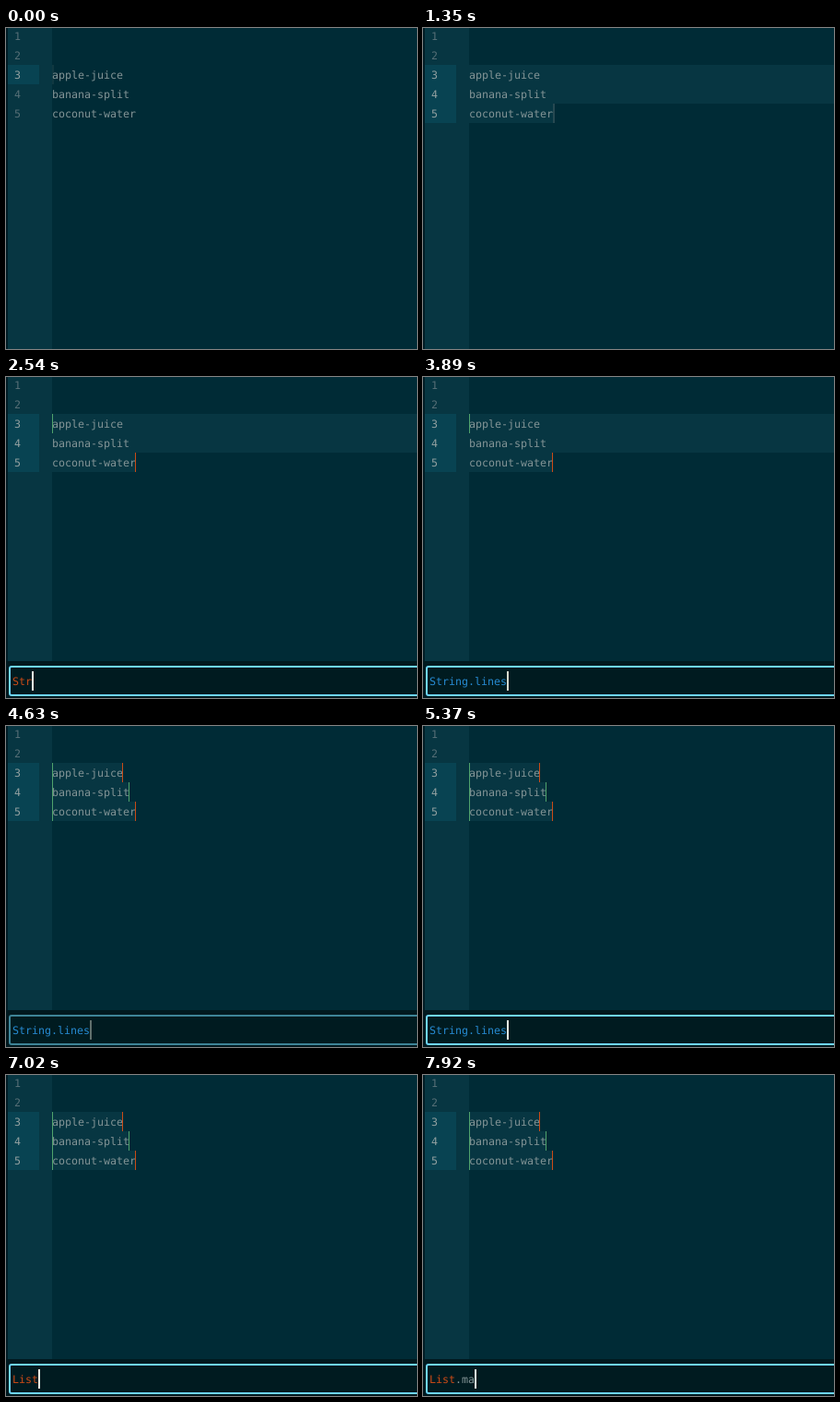
Recreate the animation shown at these times as an HTML page. Size 446 by 348 pixels, loop 8 s.

```html
<!DOCTYPE html>
<html lang="en">
<head>
<meta charset="utf-8">
<title>Editor command line</title>
<style>
  html, body { margin: 0; width: 100%; height: 100%; overflow: hidden; background: #002b36; }
  svg { display: block; width: 446px; height: 348px; }
  text {
    font: 11.63px "DejaVu Sans Mono", monospace;
    text-rendering: geometricPrecision;
    white-space: pre;
    fill: #839496;
  }
  .number { fill: #566f76; }
  .number.active { fill: #93a1a1; }
</style>
</head>
<body>
<svg id="stage" viewBox="0 0 446 348"></svg>
<script>
const stage = document.getElementById('stage');
const LOOP = 8000, CHAR = 7, ROW = 21, LEFT = 50, INPUT_X = 7;
const lines = ['', '', 'apple-juice', 'banana-split', 'coconut-water'];
const GREEN = '#4fa36c', RED = '#cb4b16', BLUE = '#268bd2', GREY = '#839496';

// Each step lists only what changes from that time on.
const steps = [
  [0, { row: 3, col: 0, caret: 0.12, panel: false, marks: '', input: '',
        color: RED, inputCaret: 0, border: '#6fd6fb', selected: false }],
  [150, { caret: 0.6 }],
  [300, { row: 4, caret: 0.8 }],
  [450, { row: 5 }],
  [600, { col: 13 }],
  [750, { caret: 0.9 }],
  [1200, { caret: 0.6 }],
  [1350, { caret: 0.3 }],
  [1500, { caret: 0 }],
  [1650, { caret: 0.3 }],
  [1800, { caret: 0, panel: true, marks: 'whole', inputCaret: 1 }],
  [2090, { inputCaret: 0.5 }],
  [2240, { inputCaret: 0 }],
  [2390, { input: 'S', inputCaret: 1 }],
  [2540, { input: 'Str' }],
  [2690, { input: 'Strin' }],
  [2840, { input: 'String.' }],
  [3140, { input: 'String.l' }],
  [3290, { input: 'String.lin' }],
  [3440, { input: 'String.lines', color: BLUE }],
  [3890, { inputCaret: 0.9 }],
  [4040, { border: '#3e8497', inputCaret: 0.4 }],
  [4190, { border: '#0d3b47', inputCaret: 0 }],
  [4480, { marks: 'lines' }],
  [4630, { border: '#3e8497', inputCaret: 0.4 }],
  [4780, { border: '#6fd6fb', inputCaret: 1 }],
  [5670, { selected: true, inputCaret: 0.5 }],
  [5820, { inputCaret: 1 }],
  [6420, { input: 'L', color: RED, selected: false }],
  [6570, { input: 'Li' }],
  [6870, { input: 'Lis' }],
  [7020, { input: 'List' }],
  [7320, { input: 'List.' }],
  [7770, { input: 'List.m' }],
  [7920, { input: 'List.ma' }]
];

const rowTop = row => (row - 1) * ROW - 2;
const rect = (x, y, w, h, fill, extra = '') =>
  `<rect x="${x}" y="${y}" width="${w}" height="${h}" fill="${fill}" ${extra}/>`;
const text = (x, y, content, extra = '') => `<text x="${x}" y="${y}" ${extra}>${content}</text>`;
const mark = (row, col, color) =>
  rect(LEFT + col * CHAR - (col ? 1 : 0), rowTop(row), 1, ROW, color);

function drawRow(s, row) {
  const y = rowTop(row), content = lines[row - 1];
  const active = row >= 3 && row <= s.row;
  let out = '';
  if (active) {
    out += rect(2, y, 34, ROW, '#084352');
    let width = row < s.row ? 446 - LEFT : s.col * CHAR;
    if (s.marks === 'lines') width = content.length * CHAR;
    out += rect(LEFT, y, width, ROW, '#073642');
  }
  out += text(9, y + 15, row, `class="number${active ? ' active' : ''}"`);
  return out + text(LEFT, y + 15, content);
}

function drawMarks(kind) {
  if (kind === 'whole') return mark(3, 0, GREEN) + mark(5, 13, RED);
  if (kind === 'lines') return [3, 4, 5].map(row =>
    mark(row, 0, GREEN) + mark(row, lines[row - 1].length, row === 4 ? GREEN : RED)).join('');
  return '';
}

function drawPanel(s) {
  const dot = s.input.indexOf('.');
  const split = s.color === BLUE || dot < 0 ? s.input.length : dot;
  const end = INPUT_X + s.input.length * CHAR;
  const spans = `<tspan fill="${s.color}">${s.input.slice(0, split)}</tspan>` +
    `<tspan fill="${GREY}">${s.input.slice(split)}</tspan>`;
  return rect(0, 308, 446, 40, '#00191f') +
    rect(4, 314, 460, 31, '#001b20', `rx="2" stroke="${s.border}" stroke-width="2"`) +
    (s.selected ? rect(INPUT_X, 319, end - INPUT_X, ROW, '#0a4655') : '') +
    text(INPUT_X, 334, spans) +
    rect(s.selected ? INPUT_X : end, 319, 2, ROW, '#f0efe2', `opacity="${s.inputCaret}"`);
}

function draw(s) {
  stage.innerHTML =
    rect(0, 0, 446, 348, '#002b36') +
    rect(0, 0, 2, 348, '#001c24') +
    rect(2, 0, 48, 348, '#073642') +
    lines.map((_, i) => drawRow(s, i + 1)).join('') +
    rect(LEFT + s.col * CHAR, rowTop(s.row), 2, ROW, '#819090', `opacity="${s.caret}"`) +
    drawMarks(s.marks) +
    (s.panel ? drawPanel(s) : '');
}

let shown = 0;
function tick(now) {
  const t = now % LOOP;
  const count = steps.filter(([at]) => at <= t).length;
  if (count !== shown) {
    shown = count;
    draw(Object.assign({}, ...steps.slice(0, count).map(step => step[1])));
  }
  requestAnimationFrame(tick);
}
tick(0);
</script>
</body>
</html>
```
